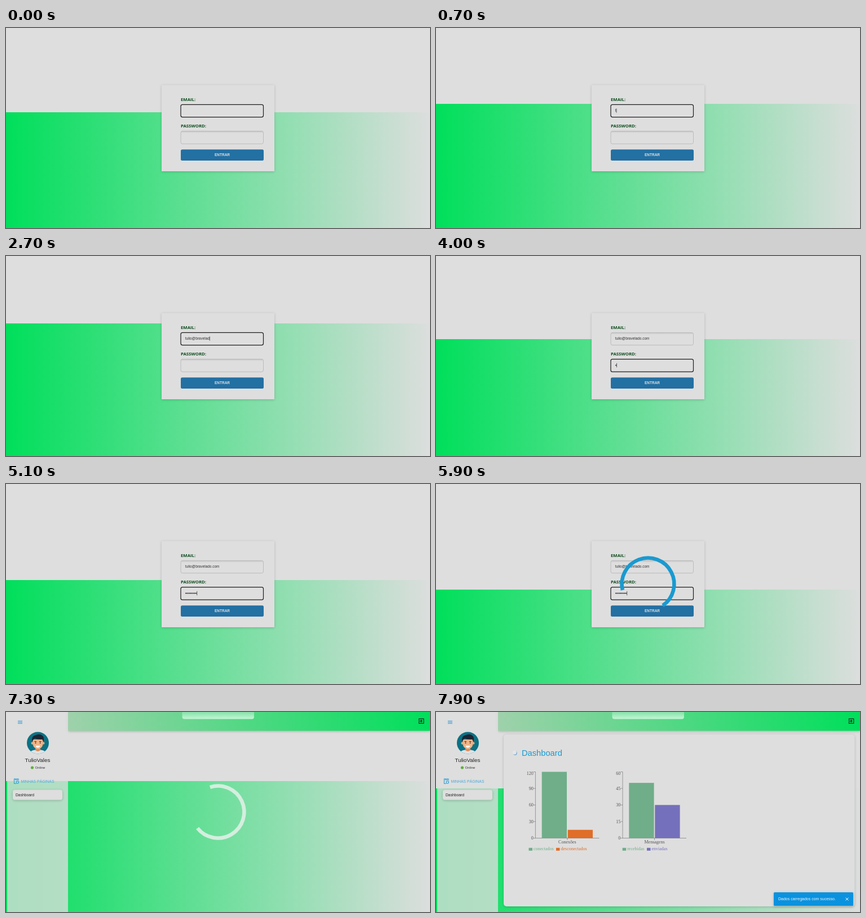
An HTML page for the animation above (8000 ms loop, 752 by 356 pixels).

```html
<!DOCTYPE html>
<html lang="pt">
<head>
<meta charset="utf-8">
<style>
  html, body { margin: 0; width: 100%; height: 100%; overflow: hidden; background: #dedede; }
  svg { display: block; width: 752px; height: 356px; }
  text { font-family: "Liberation Sans", Arial, sans-serif; }
  .label { font: bold 7.75px "Open Sans", sans-serif; fill: #0b4a1c; }
  .value { font-size: 6.45px; fill: #333; white-space: pre; }
  .chart text { font: 8px "Liberation Serif", Times, serif; }
  .axis { stroke: #666; stroke-width: .6; fill: none; }
  .card { fill: #dedede; filter: drop-shadow(0 1px 2px rgba(0,0,0,.18)); }
  .soft { filter: drop-shadow(0 1px 2px rgba(0,0,0,.22)); }
  .mid { text-anchor: middle; }
  .end { text-anchor: end; }
</style>
</head>
<body>
<svg viewBox="0 0 752 356">
  <defs>
    <linearGradient id="meadow"><stop stop-color="#00df5b"/><stop offset="1" stop-color="#dcdedd"/></linearGradient>
    <linearGradient id="bar"><stop stop-color="#9fd1ab"/><stop offset="1" stop-color="#00df5b"/></linearGradient>
    <linearGradient id="glow" x2="0" y2="1"><stop stop-color="#66d890"/><stop offset="1" stop-color="#c4f6d6"/></linearGradient>
    <linearGradient id="inset" x2="0" y2="1"><stop stop-color="#c4c4c4"/><stop offset=".15" stop-color="#dedede"/></linearGradient>
    <clipPath id="face"><circle cx="56.5" cy="55" r="19.5"/></clipPath>
  </defs>

  <rect width="752" height="356" fill="#dedede"/>
  <rect id="field" width="752" height="356" fill="url(#meadow)"/>

  <g id="login">
    <rect class="card" x="276" y="101.5" width="200" height="153.5"/>
    <text class="label" x="310" y="130">EMAIL:</text>
    <text class="label" x="310" y="177">PASSWORD:</text>
    <rect id="mailBox" x="310" y="136.4" width="146.5" height="22.2" rx="3"/>
    <rect id="passBox" x="310" y="183.6" width="146.5" height="22.6" rx="3"/>
    <text id="mail" class="value" x="317.8" y="149"></text>
    <g id="dots" fill="#222"></g>
    <path id="caret" stroke="#222" stroke-width=".7"/>
    <rect x="310" y="216.3" width="147" height="19.7" rx="2.5" fill="#2370a3"/>
    <text class="mid" x="383.5" y="228.4" font-size="6.5" font-weight="bold" fill="#dedede">ENTRAR</text>
  </g>

  <g id="home">
    <rect x="110" width="642" height="33.5" fill="url(#bar)" class="soft"/>
    <rect x="312.5" y="-6" width="127.5" height="18.5" rx="4" fill="url(#glow)"/>
    <path d="M732.4 14.5v-2.4h8.4v8h-8.4v-2.4M731.5 16.1h6M735.8 13.9l2.2 2.2-2.2 2.2" fill="none" stroke="#222" stroke-width="1.1"/>

    <rect x="2" width="108" height="356" fill="#dedede" fill-opacity=".78"/>
    <path d="M21 16h8M21 18.2h8M21 20.4h8" stroke="#2b93cf" stroke-width=".9"/>
    <g clip-path="url(#face)">
      <rect x="36" y="35" width="41" height="41" fill="#0b7184"/>
      <path d="M41 76q2-8 10-8.5h11q8 .5 10 8.5z" fill="#dfe3e6"/>
      <path d="M52 61h9v7q-4.500 4-9 0z" fill="#d98f63"/>
      <circle cx="46.7" cy="55.5" r="2.2" fill="#e9a77a"/>
      <circle cx="66.3" cy="55.5" r="2.2" fill="#e9a77a"/>
      <path d="M47.5 49h18v8q-1 8-9 9-8-1-9-9z" fill="#f0b488"/>
      <path d="M46.5 53q-2-10 5-11.5 8-3.500 13 .5 4 3 2 11-1.500-3-2.500-4.500-7 1-13-1.500-3 2-4.500 6z" fill="#1e2330"/>
      <path d="M50.5 52.5h3.500M59 52.500h3.500" stroke="#1e2330"/>
      <circle cx="52.5" cy="55" r=".9" fill="#1e2330"/>
      <circle cx="60.7" cy="55" r=".9" fill="#1e2330"/>
      <path d="M52.5 60h8q-1 3.500-4 3.500t-4-3.500z" fill="#fff"/>
    </g>
    <text class="mid" x="56" y="88.5" font-size="9.85" fill="#222">TulioVales</text>
    <circle cx="46.5" cy="99" r="2.6" fill="#62ad3c"/>
    <text x="51.5" y="101.3" font-size="6.2" fill="#333">Online</text>
    <g fill="none" stroke="#2f9fd6" stroke-width="1.1">
      <path d="M18 127.500h-3.500v-8.500h7.500v3M16.500 119v1.800h3.500V119"/>
      <circle cx="20.3" cy="125" r="2.2"/>
    </g>
    <text x="26.5" y="126" font-size="6.85" fill="#4aa9d9">MINHAS PÁGINAS</text>
    <rect x="12" y="138.500" width="88" height="18" rx="4" fill="#dedede" class="soft"/>
    <text x="17" y="150" font-size="6.75" fill="#222">Dashboard</text>

    <g id="panel">
      <rect x="120" y="40" width="622.5" height="306" rx="5" class="card"/>
      <circle cx="140.3" cy="73.3" r="3.6" fill="#82b0d0"/>
      <circle cx="139.2" cy="72.2" r="3.4" fill="#e4e6e8"/>
      <text x="152" y="78.2" font-size="14.7" fill="#1a9ad0">Dashboard</text>
      <g id="charts" class="chart"></g>
      <g id="toast">
        <rect x="599" y="321" width="141" height="24" rx="1.5" fill="#0a92df" class="soft"/>
        <text x="607" y="335.4" font-size="7" fill="#eef4f8">Dados carregados com sucesso.</text>
        <path d="M726.5 330.500l5 5m0-5l-5 5" stroke="#eef4f8"/>
      </g>
    </g>
  </g>

  <path id="spinner" fill="none"/>
</svg>
<script>
const $ = id => document.getElementById(id);
const LOOP = 8000, EMAIL = 'tulio@bravelado.com';
const SWITCH = 3600, SEND = 5500, FREEZE = 6300, LOAD = 6550, HOME = 7000, DATA = 7450;
const TOP = 106.8, SPEED = 0.02136, BASE = 224.5, HEIGHT = 118;
const clamp = (v, a = 0, b = 1) => Math.min(b, Math.max(a, v));
const show = (el, on) => el.style.display = on ? '' : 'none';

function chart(x, max, name, series) {
  let lines = `M${x} ${BASE - HEIGHT}V${BASE}h113M${x + 56.5} ${BASE}v3.5`, s = '';
  for (let i = 0; i < 5; i++) {
    const y = BASE - i * HEIGHT / 4;
    lines += `M${x} ${y}h-3.5`;
    s += `<text class="end" x="${x - 3.7}" y="${y + (i == 4 ? 5.3 : 2.6)}" fill="#555">${max * i / 4}</text>`;
  }
  s += `<path class="axis" d="${lines}"/>
    <text class="mid" x="${x + 56.5}" y="234" fill="#555">${name}</text>`;
  series.forEach(([label, value, color, lx], i) => {
    s += `<rect class="column" data-h="${value / max * HEIGHT}" x="${x + 11.3 + i * 46}" width="44.3" fill="${color}"/>
      <rect x="${lx}" y="241.8" width="6.5" height="5" fill="${color}"/>
      <text x="${lx + 8.5}" y="246.2" fill="${color}">${label}</text>`;
  });
  return s;
}
$('charts').innerHTML =
  chart(176.4, 120, 'Conexões', [['conectados', 120, '#6fae88', 164.5], ['desconectados', 15, '#e06d28', 213]]) +
  chart(331, 60, 'Mensagens', [['recebidas', 50, '#6fae88', 330.7], ['enviadas', 30, '#7570bb', 374]]);
const columns = [...document.querySelectorAll('.column')];
for (let i = 0; i < 9; i++)
  $('dots').innerHTML += `<circle cx="${319 + i * 2.28}" cy="194.5" r=".95"/>`;

function setFocus(box, on) {
  box.setAttribute('fill', on ? '#dedede' : 'url(#inset)');
  box.setAttribute('stroke', on ? '#1c1c1c' : '#b3b3b3');
  box.setAttribute('stroke-width', on ? 1.2 : .8);
}

function drawLogin(t) {
  const onMail = t < SWITCH;
  setFocus($('mailBox'), onMail);
  setFocus($('passBox'), !onMail);
  const typed = clamp(Math.floor((t - 440) / 160), 0, EMAIL.length);
  const dots = clamp(Math.floor((t - 3810) / 140), 0, 9);
  $('mail').textContent = EMAIL.slice(0, typed);
  [...$('dots').children].forEach((dot, i) => show(dot, i < dots));
  const x = 318.2 + (!onMail ? dots * 2.28 : typed ? $('mail').getComputedTextLength() : 0);
  $('caret').setAttribute('d', `M${x} ${onMail ? 143.4 : 190.8}v7.4`);
  // The caret stays solid while keys are pressed, then blinks.
  const typing = typed && typed < EMAIL.length || dots && dots < 9;
  show($('caret'), typing || t % 1000 >= 500 || t > 5000 && t < SEND);
}

// A ring opens from the middle, its arc growing as it turns.
function drawSpinner(age, color) {
  const open = clamp(age / 300), r = 8.4 + 38 * open;
  const a = 0.9 + age * 0.005, len = 0.35 + 4 * open;
  const at = u => `${376 + r * Math.cos(u)} ${178 + r * Math.sin(u)}`;
  const path = $('spinner');
  path.setAttribute('d', `M${at(a)}A${r} ${r} 0 ${+(len > Math.PI)} 1 ${at(a + len)}`);
  path.setAttribute('stroke', color);
  path.setAttribute('stroke-width', 1.6 + 5 * open);
}

function drawPanel(age) {
  const grow = 1 - (1 - clamp(age / 400)) ** 3;
  for (const c of columns) {
    const h = c.dataset.h * grow;
    c.setAttribute('y', BASE - h);
    c.setAttribute('height', h);
  }
  const fade = clamp(age / 150);
  $('toast').setAttribute('transform', `translate(669.5 333) scale(${0.8 + 0.2 * fade}) translate(-669.5 -333)`);
  $('toast').setAttribute('opacity', fade);
}

function draw(t) {
  const login = t < LOAD;
  // The edge slides at constant speed on whole pixels and starts over with the new page.
  const shift = login ? Math.abs(Math.min(t, FREEZE) - 2060) : t - 6500;
  $('field').setAttribute('y', Math.floor(TOP + SPEED * shift));
  show($('login'), login);
  show($('home'), t >= HOME);
  show($('panel'), t >= DATA);
  show($('spinner'), t >= SEND && t < DATA);
  if (login) drawLogin(Math.min(t, FREEZE));
  if (login) drawSpinner(Math.min(t, FREEZE) - SEND, '#1a9ad0');
  else drawSpinner(Math.max(0, t - 6600), '#d4eede');
  drawPanel(t - DATA);
}

const start = performance.now();
function frame() {
  draw((performance.now() - start) % LOOP);
  requestAnimationFrame(frame);
}
draw(0);
requestAnimationFrame(frame);
</script>
</body>
</html>
```
